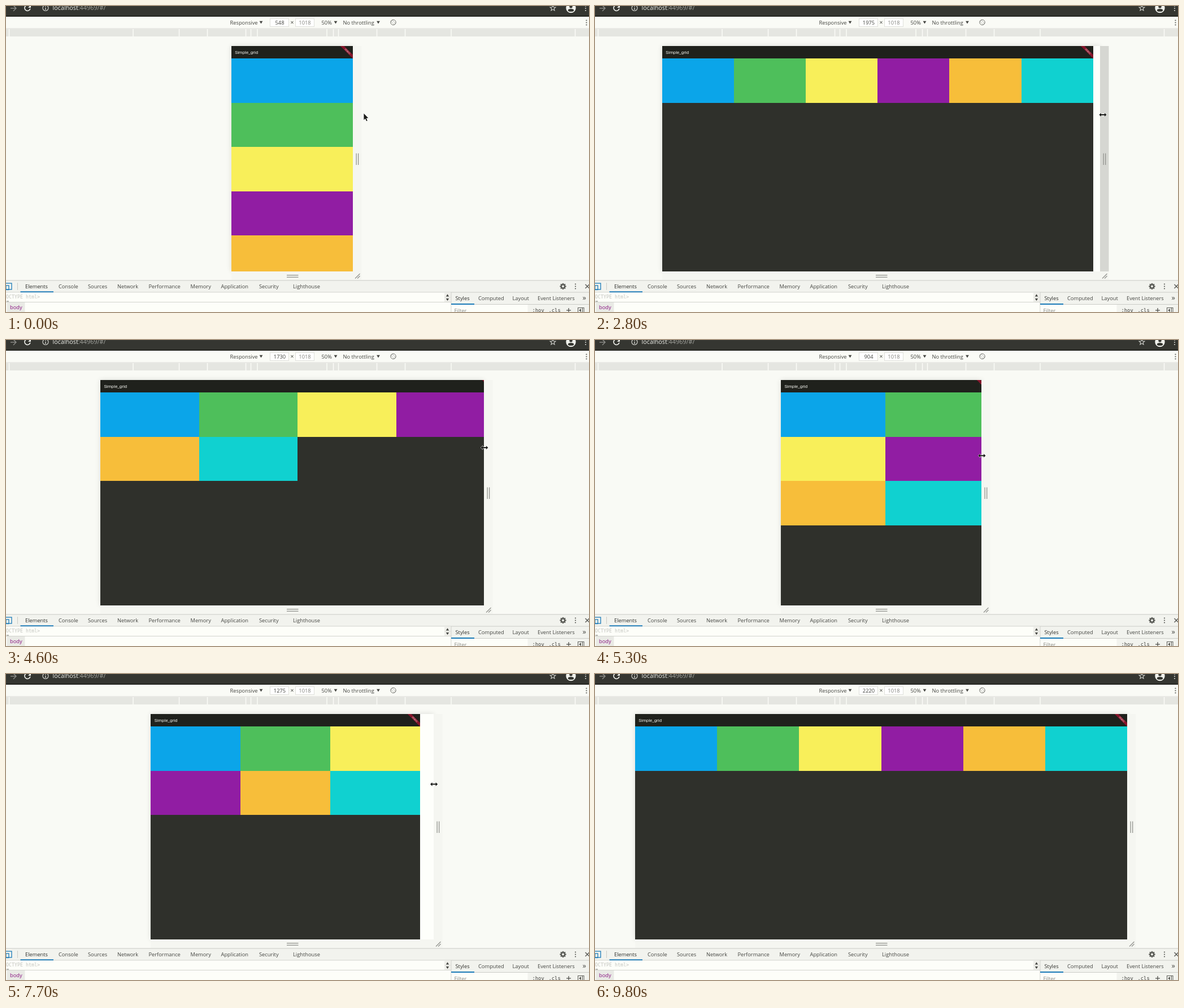
Recreate the animation shown at these times as an HTML page with a canvas. Size 1032 px wide and 543 px high, loop 10 s.

```html
<!DOCTYPE html>
<html lang="en">
<head>
<meta charset="utf-8">
<title>Responsive grid</title>
<style>
html, body { margin: 0; width: 100%; height: 100%; overflow: hidden; background: #f9faf5; }
canvas { display: block; width: 1032px; height: 543px; }
</style>
</head>
<body>
<canvas id="stage" width="1032" height="543"></canvas>
<script>
const ctx = document.getElementById('stage').getContext('2d');
const LOOP = 10000, STEP = 100, LAG = 37;
const SCALE = 0.3923, CX = 506.5, TOP = 71.4, VIEW_H = 1018;
const UI = '"Open Sans", "Noto Sans", sans-serif';
const MONO = '"DejaVu Sans Mono", monospace';
const TILES = ['#0ba5e9', '#4ebf5b', '#f8ef5a', '#911da3', '#f7be3a', '#10d1d0'];
const INK = '#454642', GREY = '#5b5c57', BLUE = '#1a7ab8', BACK = '#f9faf5';
const GRAB = 700, OFFSTAGE = 3500, RETURN = 4000, RELEASE = 8900, GONE = 9800;

// Turning points of the drag: [time, viewport width]
const DRAG = [[1200, 548], [1800, 1307], [2300, 1552], [3600, 2652], [3900, 2652], [5000, 1203],
  [6100, 108], [6600, 108], [7000, 116], [7700, 1275], [8400, 2136], [8800, 2220]];

function widthAt(t) {
  const next = DRAG.findIndex(key => t <= key[0]);
  if (next < 0) return DRAG[DRAG.length - 1][1];
  if (next === 0) return DRAG[0][1];
  const [t0, w0] = DRAG[next - 1], [t1, w1] = DRAG[next];
  return w0 + (w1 - w0) * (t - t0) / (t1 - t0);
}

function rect(x, y, w, h, color) {
  ctx.fillStyle = color;
  ctx.fillRect(x, y, w, h);
}

function frame(x, y, w, h, color, width = 1) {
  ctx.strokeStyle = color;
  ctx.lineWidth = width;
  ctx.strokeRect(x, y, w, h);
}

function text(s, x, y, color = INK, size = 9.3, family = UI, align = 'left') {
  ctx.font = size + 'px ' + family;
  ctx.textAlign = align;
  ctx.fillStyle = color;
  ctx.fillText(s, x, y);
}

function line(points, color, width = 1) {
  ctx.beginPath();
  points.forEach(([x, y]) => ctx.lineTo(x, y));
  ctx.strokeStyle = color;
  ctx.lineWidth = width;
  ctx.stroke();
}

function shape(points, fill, edge, width = 1) {
  ctx.beginPath();
  points.forEach(([x, y]) => ctx.lineTo(x, y));
  ctx.closePath();
  if (edge) {
    ctx.strokeStyle = edge;
    ctx.lineWidth = width;
    ctx.stroke();
  }
  if (fill) {
    ctx.fillStyle = fill;
    ctx.fill();
  }
}

function disc(x, y, r, color) {
  ctx.beginPath();
  ctx.arc(x, y, r, 0, 7);
  ctx.fillStyle = color;
  ctx.fill();
}

function arc(x, y, r, color, width, from = 0, to = 2 * Math.PI) {
  ctx.beginPath();
  ctx.arc(x, y, r, from, to);
  ctx.strokeStyle = color;
  ctx.lineWidth = width;
  ctx.stroke();
}

function dots(x, y, color) {
  for (let i = -1; i < 2; i++) disc(x, y + i * 4, 1.1, color);
}

function cross(x, y, r, color) {
  line([[x - r, y - r], [x + r, y + r]], color, 1.4);
  line([[x + r, y - r], [x - r, y + r]], color, 1.4);
}

const triangle = (x, y, r, color, dir = 1) =>
  shape([[x - r, y - r * 0.8 * dir], [x + r, y - r * 0.8 * dir], [x, y + r * 0.9 * dir]], color);

function browserBar() {
  const dark = '#353631', pale = '#f0f1ec', dim = '#d0d1cc';
  rect(0, 0, 1032, 18, dark);
  rect(0, 17, 1032, 2, '#262722');
  line([[8, 4], [18, 4]], '#8e8f8a', 1.4);
  line([[13, -1], [18, 4], [13, 9]], '#8e8f8a', 1.4);
  arc(38, 3.5, 5, pale, 1.6, 0.2, 5.4);
  shape([[44, -2], [44, 3], [39, 3]], pale);
  arc(70, 3.5, 5, dim, 1.2);
  rect(69.3, 3, 1.4, 4, dim);
  rect(69.3, 0.5, 1.4, 1.4, dim);
  text('localhost', 82.5, 7, pale, 10.8);
  text(':44969/#/', 82.5 + ctx.measureText('localhost').width, 7, '#a5a6a1', 10.8);
  const star = [];
  for (let i = 0; i < 10; i++) {
    const r = i % 2 ? 2.3 : 5.2, a = i * Math.PI / 5 - Math.PI / 2;
    star.push([968 + r * Math.cos(a), 3.8 + r * Math.sin(a)]);
  }
  shape(star, null, dim, 1.1);
  disc(1000, 3.5, 8.7, pale);
  disc(1000, 1, 2.7, dark);
  ctx.beginPath();
  ctx.ellipse(1000, 7.5, 5.2, 2.6, 0, 0, 7);
  ctx.fill();
  dots(1026, 4, dim);
}

function deviceBar(width) {
  rect(0, 19, 1032, 21, '#fafbf6');
  rect(0, 39.5, 1032, 1, '#d9dad5');
  text('Responsive', 396.5, 33);
  text('50%', 558.5, 33);
  text('No throttling', 596.5, 33);
  for (const x of [451.5, 583.5, 659]) triangle(x, 29, 2.9, INK);
  for (const x of [467.5, 512.5]) {
    rect(x, 22.5, 33, 14, '#fff');
    frame(x, 22.5, 33, 14, '#dfe0db');
  }
  text(Math.round(width), 484.5, 33, INK, 9.3, UI, 'center');
  text('×', 506.5, 33, INK, 10.5, UI, 'center');
  text('1018', 529, 33, '#80817c', 9.3, UI, 'center');
  arc(685.5, 29, 4.7, '#72736e');
  shape([[682, 27.5], [684, 25.5], [689, 30.5], [687, 32.5]], '#fafbf6', '#72736e');
  dots(1027.5, 29.5, GREY);
  rect(0, 41, 1032, 13, '#e5e6e1');
  for (const d of [61.5, 73, 82, 150, 200, 281.5, 501])
    for (const side of [-1, 1]) rect(CX + side * d - 0.7, 41, 1.5, 13, '#fbfcf7');
}

function fitTitle(room) {
  let s = 'Simple_grid';
  if (ctx.measureText(s).width <= room) return s;
  while (s && ctx.measureText(s + '...').width > room) s = s.slice(0, -1);
  return s + '...';
}

function columns(width) {
  const breaks = [[1920, 6], [1280, 4], [960, 3], [600, 2], [0, 1]];
  return breaks.find(([min]) => width >= min)[1];
}

// Edges land on whole stage pixels; width is in page units.
function app(left, width) {
  const px = v => Math.round(left + v * SCALE), py = v => Math.round(TOP + v * SCALE);
  const box = (x, y, w, h, color) =>
    rect(px(x), py(y), px(x + w) - px(x), py(y + h) - py(y), color);
  const cols = columns(width), w = width / cols;
  box(0, 0, width, VIEW_H, '#2f302b');
  TILES.forEach((color, i) => box(i % cols * w, 56 + Math.floor(i / cols) * 200, w, 200, color));
  box(0, 0, width, 56, '#1f211c');
  ctx.font = 20 * SCALE + 'px Roboto, sans-serif';
  text(fitTitle((width - 32) * SCALE), left + 16 * SCALE, 84.8, '#f2f3ee', 20 * SCALE, 'Roboto, sans-serif');

  ctx.beginPath();
  ctx.rect(px(0), py(0), px(width) - px(0), 400);
  ctx.clip();
  ctx.translate(px(width), py(0));
  ctx.rotate(Math.PI / 4);
  ctx.scale(SCALE, SCALE);
  rect(-40, 28, 80, 12, '#86142a');
  text('DEBUG', 0, 37.5, '#f0dcdc', 10, 'Roboto, sans-serif', 'center');
}

function device(width, laidOut, shade) {
  const half = width * SCALE / 2, grip = '#92938e';
  const left = Math.round(CX - half), right = Math.round(CX + half);
  const top = 71, bottom = 471, w = right - left;
  ctx.save();
  ctx.shadowColor = 'rgba(0,0,0,.12)';
  ctx.shadowBlur = 9;
  rect(left, top, w, bottom - top, '#fefffb');
  ctx.restore();
  rect(right, top, 15.5, bottom - top, shade);
  rect(left, bottom, w + 15.5, 16, '#f5f6f1');

  ctx.save();
  ctx.beginPath();
  ctx.rect(left, top, w, bottom - top);
  ctx.clip();
  app(CX - half, laidOut);
  ctx.restore();

  for (const d of [5.5, 9]) rect(right + d, 261.5, 1.3, 20.5, grip);
  for (const y of [477, 480.6]) rect(497, y, 20.5, 1.3, grip);
  for (const d of [4, 8]) line([[right + d, 483.5], [right + 12.5, 471 + d]], grip, 1.2);
}

function devTools() {
  const edge = '#cbccc7', page = '#fdfef9', strong = '#2f302c';
  rect(0, 486.5, 1032, 57, '#f2f3ee');
  rect(0, 486.5, 1032, 1, edge);
  rect(0, 507.5, 1032, 1, edge);
  frame(-3, 492, 13, 11, BLUE, 1.3);
  frame(0, 496, 5, 7.5, BLUE, 1.3);
  rect(20, 491, 1, 13, edge);
  const tabs = { Elements: 34, Console: 93, Sources: 145, Network: 197, Performance: 252.5,
    Memory: 326.5, Application: 380.5, Security: 448, Lighthouse: 508 };
  for (const name in tabs) text(name, tabs[name], 500.5, name === 'Elements' ? strong : INK);
  rect(25.5, 506.3, 58.5, 2, BLUE);

  for (let i = 0; i < 8; i++) {
    const c = Math.cos(i * Math.PI / 4), s = Math.sin(i * Math.PI / 4);
    line([[986 + 3 * c, 497.5 + 3 * s], [986 + 5.6 * c, 497.5 + 5.6 * s]], GREY, 2.3);
  }
  arc(986, 497.5, 3.1, GREY, 2.4);
  dots(1008, 497.5, GREY);
  cross(1029, 497.5, 3.5, GREY);

  rect(0, 508.5, 788, 34.5, page);
  text('<!DOCTYPE html>', -15, 519, '#c3c4bf', 8.3, MONO);
  rect(1, 523.5, 4, 1, '#777873');
  rect(776, 509, 11, 16, '#efefea');
  rect(776, 516.5, 11, 1, '#d8d9d4');
  triangle(781.5, 513.5, 2.6, INK, -1);
  triangle(781.5, 521, 2.6, INK);
  rect(0, 525, 788, 1, '#d2d3ce');
  rect(1.5, 526, 32, 17, '#e9eae5');
  text('body', 7, 538, '#881280');

  rect(787.5, 508, 1, 35, edge);
  rect(788.5, 529, 244, 1, edge);
  text('Styles', 795.5, 522, strong);
  text('Computed', 836, 522);
  text('Layout', 896.5, 522);
  text('Event Listeners', 941, 522);
  text('»', 1020.5, 522, INK, 13);
  rect(788, 528, 41, 2, BLUE);
  rect(788.5, 530, 135, 13, page);
  text('Filter', 793.5, 543.5, '#898a85');
  text(':hov', 931.5, 543, INK, 8.8, MONO);
  text('.cls', 960.5, 543, INK, 8.8, MONO);
  line([[992, 540], [1000, 540]], INK, 1.2);
  line([[996, 536], [996, 544]], INK, 1.2);
  frame(1012.5, 535.5, 10.5, 9, GREY);
  shape([[1014, 540], [1018, 537], [1018, 543]], GREY);
  rect(1020, 536, 1, 8, GREY);
}

function pointer(x, y) {
  const outline = [[0, 0], [0, 11.5], [2.6, 9], [4.6, 13.4], [6.3, 12.6], [4.4, 8.3], [7.8, 8]];
  shape(outline.map(([a, b]) => [x + a, y + b]), '#1b1c19', '#fff', 1);
}

function resizer(x, y) {
  const tips = [];
  for (const s of [-1, 1])
    tips.push([x + 3 * s, y + s], [x + 3 * s, y + 3.3 * s], [x + 6.6 * s, y],
      [x + 3 * s, y - 3.3 * s], [x + 3 * s, y - s]);
  shape(tips, '#1b1c19', '#fff', 1);
}

function cursor(t, width) {
  const right = CX + width * SCALE / 2;
  if (t < GRAB) pointer(633.4, 190.8);
  else if (t < OFFSTAGE) resizer(right + 5, 193);
  else if (t >= RETURN && t < RELEASE) resizer(right + 1, Math.max(191, 229 - width * 0.0262));
  else if (t >= RELEASE && t < GONE) {
    const u = (t - RELEASE) / (GONE - RELEASE);
    pointer(941 - 900 * u, 182 * (1 - u));
  }
}

function draw(now) {
  const t = Math.floor(now % LOOP / STEP) * STEP;
  const width = widthAt(t);
  rect(0, 0, 1032, 543, BACK);
  device(width, widthAt(t - LAG), t >= GRAB && t < OFFSTAGE ? '#d6d7d2' : '#f5f6f1');
  browserBar();
  deviceBar(width);
  devTools();
  cursor(t, width);
}

const start = performance.now();
function tick() {
  draw(performance.now() - start);
  requestAnimationFrame(tick);
}
tick();
</script>
</body>
</html>
```
